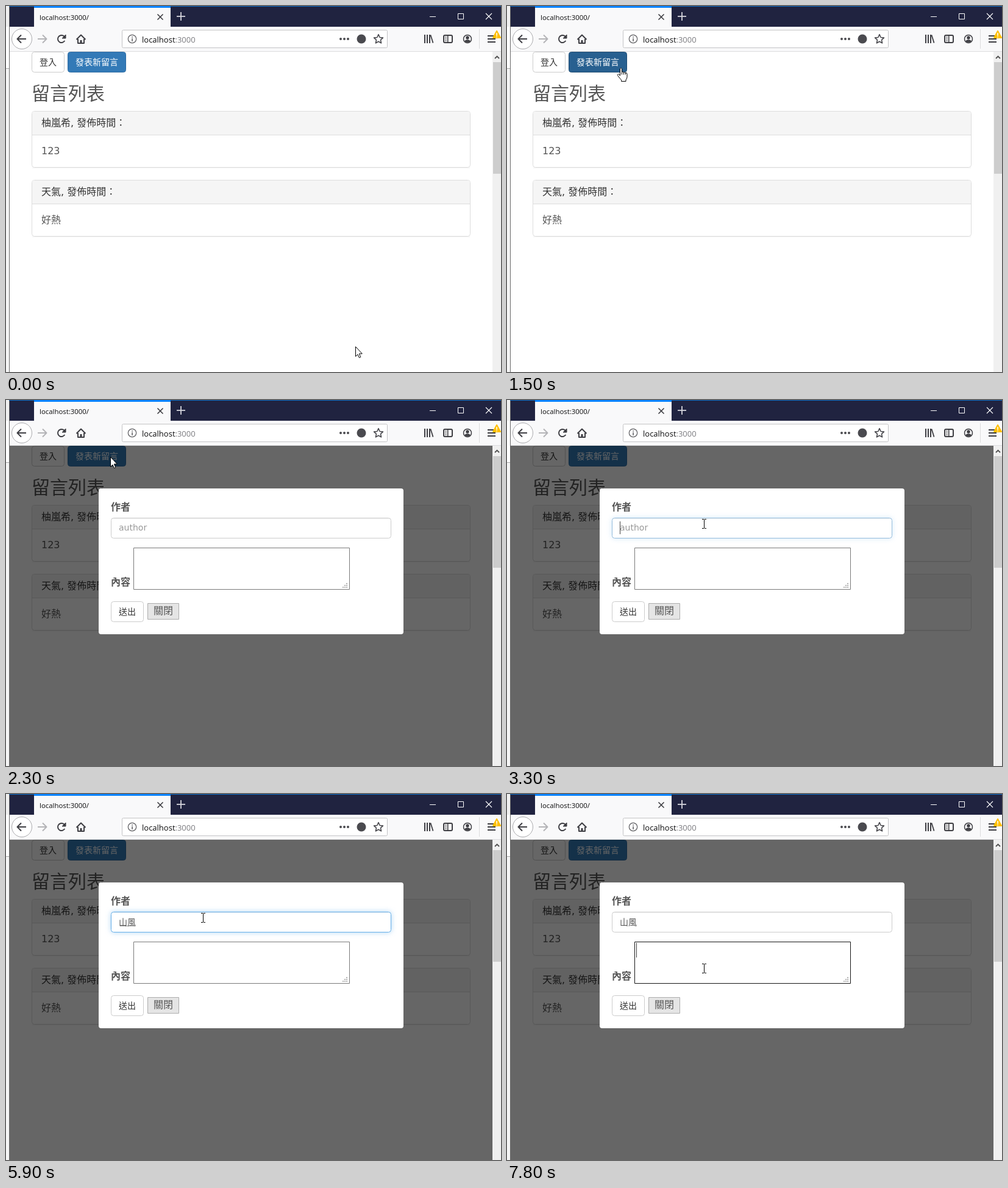
These frames come from a looping animation (812x600 px, 8000 ms). An HTML page with a canvas:

```html
<!DOCTYPE html>
<html lang="zh-Hant">
<head>
<meta charset="utf-8">
<title>留言列表</title>
<style>
html, body { margin: 0; width: 100%; height: 100%; overflow: hidden; background: #fff; }
canvas { display: block; }
</style>
</head>
<body>
<canvas id="stage" width="812" height="600"></canvas>
<script>
const ctx = document.getElementById('stage').getContext('2d');
const LOOP = 8000, STEP = 100;
const PAGE_FONT = '"DejaVu Sans", "Noto Sans CJK TC", "Noto Sans CJK JP", sans-serif';
const CJK_FONT = '"Noto Sans CJK TC", "Noto Sans CJK JP", "Noto Sans CJK", sans-serif';
const UI_FONT = '"Open Sans", "Noto Sans", sans-serif';

// Pointer waypoints: time, x, y
const POINTER = [
  [400, 573, 558], [700, 478, 506], [1000, 348, 420], [1150, 281, 266], [1300, 228, 132],
  [1400, 201, 112], [1500, 184, 101], [1700, 171, 93],
  [2500, 171, 93], [2800, 275, 165], [3000, 323, 203],
  [6900, 323, 203], [7200, 323, 286]
];
const TYPED = [
  [0, ''], [4900, 'ㄕ'], [5000, 'ㄕㄢ'], [5100, '山'],
  [5400, '山ㄈ'], [5600, '山ㄈㄥ'], [5700, '山風']
];
const CARET = [
  [0, 0], [3300, 1], [3800, 0], [4300, 1], [4800, 0], [4900, 1],
  [5900, 0], [6200, 1], [6500, 0], [7000, 1], [7500, 0]
];
const GLOW = [
  [0, 0], [3300, 0.55], [3400, 1], [7500, 0.75], [7600, 0.35], [7700, 0.1], [7800, 0]
];

const at = (keys, t) => keys.filter(k => k[0] <= t).pop()[1];

function pointerAt(t) {
  let a = POINTER[0];
  for (const b of POINTER) {
    if (t < b[0]) {
      const p = Math.max(0, (t - a[0]) / (b[0] - a[0] || 1));
      return [Math.round(a[1] + (b[1] - a[1]) * p), Math.round(a[2] + (b[2] - a[2]) * p)];
    }
    a = b;
  }
  return [a[1], a[2]];
}

function rect(x, y, w, h, fill) {
  ctx.fillStyle = fill;
  ctx.fillRect(x, y, w, h);
}

function box(x, y, w, h, r, fill, stroke) {
  ctx.beginPath();
  ctx.roundRect(x + 0.5, y + 0.5, w - 1, h - 1, r);
  if (fill) { ctx.fillStyle = fill; ctx.fill(); }
  if (stroke) { ctx.strokeStyle = stroke; ctx.lineWidth = 1; ctx.stroke(); }
}

function text(str, x, y, size, color, font = PAGE_FONT, weight = 400) {
  ctx.font = `${weight} ${size}px ${font}`;
  ctx.fillStyle = color;
  ctx.fillText(str, x, y);
}

function line(points, color, width = 1, close = false, fill) {
  ctx.beginPath();
  points.forEach(([x, y], i) => i ? ctx.lineTo(x, y) : ctx.moveTo(x, y));
  if (close) ctx.closePath();
  if (fill) { ctx.fillStyle = fill; ctx.fill(); }
  ctx.strokeStyle = color;
  ctx.lineWidth = width;
  ctx.stroke();
}

function circle(x, y, r, fill, stroke, width = 1) {
  ctx.beginPath();
  ctx.arc(x, y, r, 0, Math.PI * 2);
  if (fill) { ctx.fillStyle = fill; ctx.fill(); }
  if (stroke) { ctx.strokeStyle = stroke; ctx.lineWidth = width; ctx.stroke(); }
}

function cross(x, y, r, color, width) {
  line([[x - r, y - r], [x + r, y + r]], color, width);
  line([[x + r, y - r], [x - r, y + r]], color, width);
}

function arrow(x, dir, color) {
  line([[x - 7 * dir, 54], [x + 7 * dir, 54]], color, 2);
  line([[x + dir, 47.5], [x + 7.5 * dir, 54], [x + dir, 60.5]], color, 2);
}

function drawTabs() {
  rect(0, 0, 5, 34, '#f0f0f0');
  rect(0, 34, 5, 566, '#fff');
  rect(0, 102, 5, 1, '#a8a8a8');
  rect(0, 103, 5, 497, '#f5f5f5');
  rect(5, 0, 1, 600, '#6a6a6a');
  rect(6, 0, 806, 34, '#202340');
  rect(5, 0, 807, 1, '#0c6cc4');
  rect(46, 0, 224, 34, '#f9f9fa');
  rect(46, 0, 224, 3, '#0a84ff');
  text('localhost:3000/', 55, 23, 11.4, '#0c0c0d', UI_FONT);
  cross(253, 18, 4.5, '#3b3b40', 1.6);
  line([[280, 17], [294, 17]], '#d5d5dc', 1.8);
  line([[287, 10], [287, 24]], '#d5d5dc', 1.8);
  rect(695, 17, 10, 1, '#fff');
  box(741, 12, 10, 10, 0, null, '#fff');
  cross(792, 17, 5, '#fff', 1.1);
}

function drawStar(cx, cy) {
  const pts = Array.from({ length: 10 }, (_, i) => {
    const a = -Math.PI / 2 + i * Math.PI / 5, r = i % 2 ? 3.7 : 7.8;
    return [cx + r * Math.cos(a), cy + r * Math.sin(a)];
  });
  line(pts, '#4a4a4f', 1.6, true);
}

function drawToolbar() {
  const ink = '#3e3e43';
  rect(6, 34, 806, 40, '#f9f9fa');
  rect(6, 74, 806, 1, '#dcdcde');
  ctx.lineJoin = 'round';
  circle(26, 54, 16.5, '#fff', '#a9a9ac');
  arrow(26, -1, ink);
  arrow(59, 1, '#b4b4b7');

  ctx.beginPath();
  ctx.arc(91, 54, 6, 0.5, Math.PI * 1.78);
  ctx.strokeStyle = ink;
  ctx.lineWidth = 2;
  ctx.stroke();
  line([[98, 47], [98, 53], [92, 53]], ink, 1, true, ink);

  line([[115.5, 55], [123, 47.5], [130.5, 55]], ink, 2);
  line([[118, 54], [118, 61], [128, 61], [128, 54]], ink, 2);
  rect(121.5, 56, 3, 5, ink);

  box(190, 39, 436, 30, 2, '#fff', '#c3c3c5');
  circle(207, 54, 6.7, null, '#5a5a5e', 1.2);
  rect(206.3, 53, 1.5, 5, '#5a5a5e');
  rect(206.3, 50, 1.5, 1.7, '#5a5a5e');
  text('localhost', 223, 60, 13, '#0c0c0d', UI_FONT);
  const w = ctx.measureText('localhost').width;
  text(':3000', 223 + w, 60, 13, '#7c7c80', UI_FONT);
  for (let i = 0; i < 3; i++) circle(549 + i * 6, 54, 2, '#4a4a4f');
  circle(583, 54, 7.5, '#4a4a4f');
  drawStar(611, 54.5);

  for (const x of [686, 690, 694]) rect(x, 47, 2, 14, ink);
  line([[696.5, 47.5], [700.5, 60.5]], ink, 1.8);
  ctx.beginPath();
  ctx.roundRect(718, 48, 14, 12, 2);
  ctx.strokeStyle = ink;
  ctx.lineWidth = 2;
  ctx.stroke();
  rect(724, 48, 1.5, 12, ink);
  for (const y of [51, 54, 57]) rect(720, y - 0.5, 3, 1, ink);
  circle(757, 54, 6.5, null, ink, 1.5);
  circle(757, 52, 2.7, ink);
  ctx.beginPath();
  ctx.ellipse(757, 57.5, 4.2, 2.2, 0, 0, Math.PI * 2);
  ctx.fill();
  rect(776, 38, 1, 32, '#dcdcde');
  for (const y of [48, 53, 58]) rect(790, y, 13, 2, ink);
  line([[805, 41], [811, 52], [799, 52]], '#ffbf00', 2, true, '#ffbf00');
  rect(804.3, 44, 1.5, 5, '#fff');
  rect(804.3, 50, 1.5, 1.5, '#fff');
  ctx.lineJoin = 'miter';
}

function drawCard(y, author, body) {
  rect(43, y + 93, 718, 1, '#f2f2f2');
  box(42, y, 720, 93, 4, '#fff', '#ddd');
  ctx.beginPath();
  ctx.roundRect(43, y + 1, 718, 38, [3, 3, 0, 0]);
  ctx.fillStyle = '#f5f5f5';
  ctx.fill();
  rect(43, y + 39, 718, 1, '#ddd');
  text(author + ', 發佈時間：', 58, y + 25, 16, '#333');
  text(body, 58, y + 71, 16, '#555');
}

function drawPage(t) {
  rect(6, 75, 792, 525, '#fff');
  box(42, 75, 54, 34, 4, '#fff', '#ccc');
  text('登入', 55, 97, 14, '#333', CJK_FONT);

  const hover = t >= 1500 && t < 2300, down = t >= 2100 && t < 2300;
  const fill = down ? '#204d74' : hover ? '#286090' : '#337ab7';
  const edge = down ? '#122b40' : hover ? '#204d74' : '#2e6da4';
  box(101, 75, 96, 34, 4, fill, edge);
  if (down) {
    ctx.setLineDash([1, 1]);
    line([[103, 77.5], [195, 77.5]], '#102a42');
    line([[103, 106.5], [195, 106.5]], '#102a42');
    ctx.setLineDash([]);
  }
  text('發表新留言', 114, 97, 14, '#fff', CJK_FONT);

  text('留言列表', 42, 154, 30, '#555', CJK_FONT);
  drawCard(172, '柚嵐希', '123');
  drawCard(285, '天氣', '好熱');

  rect(798, 75, 14, 525, '#f0f0f0');
  rect(799, 92, 13, 183, '#cdcdcd');
  line([[802, 86], [805.5, 82.5], [809, 86]], '#505050', 1.8);
}

function drawInput(t) {
  const g = at(GLOW, t);
  const mix = (a, b) => Math.round(a + (b - a) * g);
  if (g) {
    ctx.save();
    ctx.shadowColor = `rgba(102,175,233,${0.6 * g})`;
    ctx.shadowBlur = 8;
    box(172, 193, 460, 34, 4, '#fff');
    ctx.restore();
  }
  box(172, 193, 460, 34, 4, '#fff', `rgb(${mix(204, 102)},${mix(204, 175)},${mix(204, 233)})`);
  rect(175, 194, 454, 1, 'rgba(0,0,0,.06)');

  const str = at(TYPED, t), end = 185 + 14 * str.length;
  if (str) text(str, 185, 215, 14, '#555', CJK_FONT);
  else text('author', 185, 214, 14, '#999');
  if (str && t < 6200) {
    for (let x = 187; x < end - 1; x += 2) rect(x, 216, 1, 1, '#555');
  }
  if (at(CARET, t)) rect(end, 199, 1, 21, '#444');
}

function drawModal(t) {
  rect(6, 75, 792, 525, 'rgba(0,0,0,.6)');
  ctx.beginPath();
  ctx.roundRect(152, 145, 500, 239, 4);
  ctx.fillStyle = '#fff';
  ctx.fill();
  text('作者', 172, 181, 16, '#555', CJK_FONT, 700);
  drawInput(t);

  text('內容', 172, 304, 16, '#555', CJK_FONT, 700);
  box(209, 242, 355, 69, 0, '#fff', t >= 7100 ? '#171717' : '#7a7a7a');
  for (let r = 0; r < 3; r++)
    for (let c = 2 - r; c < 3; c++) rect(552 + c * 3, 300 + r * 3, 2, 2, '#b4b4b4');
  if (t >= 7500) rect(212, 244, 1, 24, '#444');

  box(172, 330, 54, 34, 4, '#fff', '#ccc');
  text('送出', 185, 352, 14, '#333', CJK_FONT);
  box(232, 333, 52, 27, 0, '#e5e5e5', '#adadad');
  text('關閉', 242, 351, 16, '#555', CJK_FONT);
}

function drawArrow() {
  line([[0.5, 0.5], [0.5, 16.5], [4, 13.2], [6.4, 18.6], [8.8, 17.6], [6.4, 12], [11.3, 12]],
    '#000', 1, true, '#fff');
}

function drawHand() {
  const p = new Path2D('M1.5 1.8Q3-.6 4.4 1.8V7.5Q6 5.8 7.4 8Q9 6.4 10.3 8.8Q12.6 7.6 13 10.5' +
    'V15.5Q12.5 18.5 11 20V22.5H3.6V20.3Q1 17.5-1.8 13.8Q-3.8 10.8-1.3 10.6L1.5 13Z');
  ctx.fillStyle = '#fff';
  ctx.fill(p);
  ctx.strokeStyle = '#000';
  ctx.lineWidth = 1;
  ctx.stroke(p);
  for (const x of [4.4, 7.4, 10.3]) line([[x, 8], [x, 11.5]], '#000');
}

function drawBeam() {
  rect(0, -7, 1, 14, '#000');
  for (const y of [-8, 7]) {
    rect(-3, y, 3, 1, '#000');
    rect(1, y, 3, 1, '#000');
  }
}

function drawPointer(t) {
  const [x, y] = pointerAt(t);
  const inField = t >= 2300 && x > 172 && ((y > 193 && y < 227) || (y > 242 && y < 311));
  ctx.save();
  ctx.translate(x, y);
  if (inField) drawBeam();
  else if (t >= 1500 && t < 2300) drawHand();
  else drawArrow();
  ctx.restore();
}

function frame(now) {
  const t = Math.floor((now % LOOP) / STEP) * STEP;
  drawTabs();
  drawToolbar();
  drawPage(t);
  if (t >= 2300) drawModal(t);
  drawPointer(t);
  requestAnimationFrame(frame);
}
requestAnimationFrame(frame);
</script>
</body>
</html>
```
